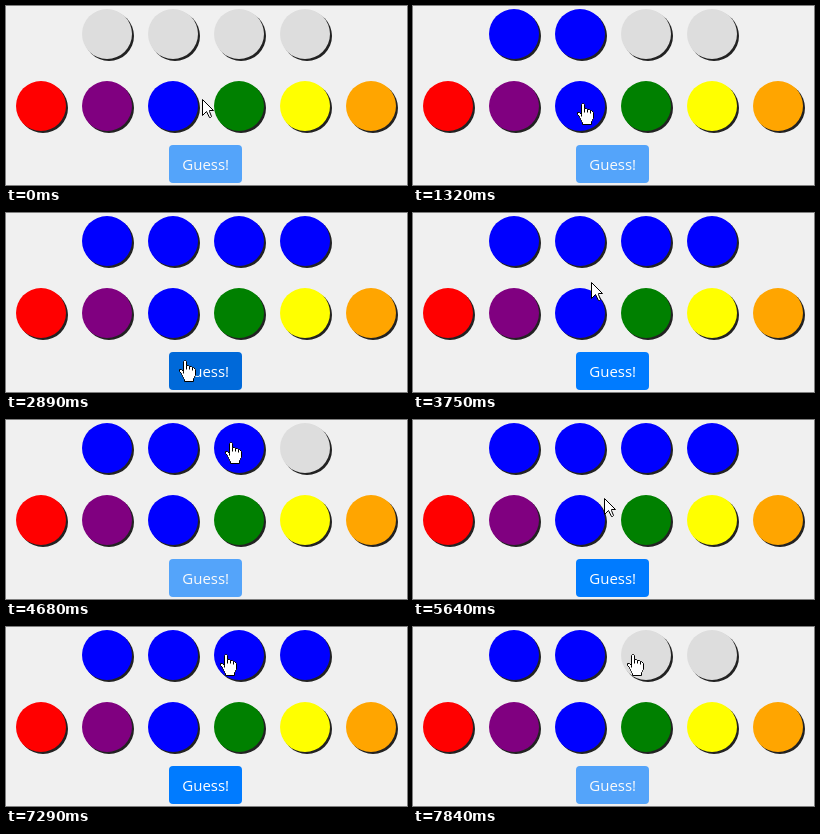
An HTML page with a canvas that plays this animation: 401 px wide and 179 px high, repeating every 8 s.

```html
<!DOCTYPE html>
<html lang="en">
<head>
<meta charset="utf-8">
<title>Colour guess</title>
<style>
  html, body { margin: 0; width: 100%; height: 100%; overflow: hidden; background: #f0f0f0; }
  canvas { display: block; }
</style>
</head>
<body>
<canvas id="stage" width="401" height="179"></canvas>
<script>
const ctx = document.getElementById('stage').getContext('2d');
const LOOP = 8000;
const PALETTE = ['red', 'purple', 'blue', 'green', 'yellow', 'orange'];

// [start ms, number of filled slots]
const fills = [
  [0, 0], [930, 1], [1320, 2], [1870, 3], [2190, 4], [4680, 3],
  [5640, 4], [6280, 3], [6910, 4], [7530, 3], [7840, 2]
];

// [start ms, cursor, left, top]
const moves = [
  [0, 'arrow', 196, 93], [380, 'hand', 186, 94], [610, 'hand', 164, 97],
  [2590, 'arrow', 171, 132], [2810, 'hand', 172, 144], [2890, 'hand', 173, 147],
  [3140, 'arrow', 172, 128], [3210, 'hand', 167, 110],
  [3750, 'arrow', 178, 69], [3830, 'arrow', 179, 69],
  [4060, 'arrow', 197, 51], [4140, 'arrow', 209, 42], [4360, 'hand', 219, 22],
  [4990, 'arrow', 207, 65], [5080, 'arrow', 197, 80], [5330, 'hand', 177, 91],
  [5640, 'arrow', 191, 78], [5720, 'arrow', 211, 53], [5970, 'hand', 221, 27],
  [6590, 'arrow', 198, 70], [6670, 'hand', 172, 90], [6910, 'hand', 171, 91],
  [7210, 'arrow', 200, 67], [7290, 'hand', 214, 27]
];

// [start ms, button hover strength]
const hovers = [[0, 0], [2810, 0.5], [2890, 1], [3140, 0.5], [3210, 0]];

const cursors = {
  arrow: {
    outline: new Path2D('M0 0V16L4 12L7 18H8L9 17L7 12V11H11Z'),
    creases: new Path2D()
  },
  hand: {
    outline: new Path2D('M5 0H6L7 1V5H9L10 6H12L13 7H14L16 9V15L15 16V17L14 18V21H5V19L4 18V17L3 16V15L2 14V13L0 11V9H2L4 11V1Z'),
    creases: new Path2D('M7 5V9M10 6V9M13 7V10M4 11V13')
  }
};

const at = (track, t) => track.findLast(step => step[0] <= t);

function disc(x, y, color) {
  ctx.fillStyle = color;
  ctx.beginPath();
  ctx.arc(x, y, 25, 0, Math.PI * 2);
  ctx.fill();
}

function peg(x, y, color) {
  disc(x + 2, y + 2, '#222');
  disc(x, y, color);
}

function drawButton(enabled, hover) {
  const green = Math.round(123 - 18 * hover);
  const blue = Math.round(255 - 38 * hover);
  ctx.fillStyle = enabled ? `rgb(0,${green},${blue})` : '#54a4fa';
  ctx.beginPath();
  ctx.roundRect(163, 139, 73, 38, 4);
  ctx.fill();
  ctx.fillStyle = enabled ? '#fff' : '#fafafa';
  ctx.font = '15px "Open Sans", "Noto Sans", sans-serif';
  ctx.textAlign = 'center';
  ctx.fillText('Guess!', 199.7, 164);
}

function drawCursor(kind, x, y) {
  const { outline, creases } = cursors[kind];
  ctx.save();
  ctx.translate(x + 0.5, y + 0.5);
  ctx.fillStyle = '#fff';
  ctx.strokeStyle = '#000';
  ctx.lineWidth = 1;
  ctx.lineJoin = 'round';
  ctx.fill(outline);
  ctx.stroke(outline);
  ctx.stroke(creases);
  ctx.restore();
}

function render(t) {
  const filled = at(fills, t)[1];
  ctx.fillStyle = '#f0f0f0';
  ctx.fillRect(0, 0, 401, 179);
  for (let i = 0; i < 4; i++) peg(101 + 66 * i, 28, i < filled ? 'blue' : '#ddd');
  PALETTE.forEach((color, i) => peg(35 + 66 * i, 100, color));
  drawButton(filled === 4, at(hovers, t)[1]);
  drawCursor(...at(moves, t).slice(1));
}

const start = performance.now();
function tick() {
  render((performance.now() - start) % LOOP);
  requestAnimationFrame(tick);
}
tick();
</script>
</body>
</html>
```
